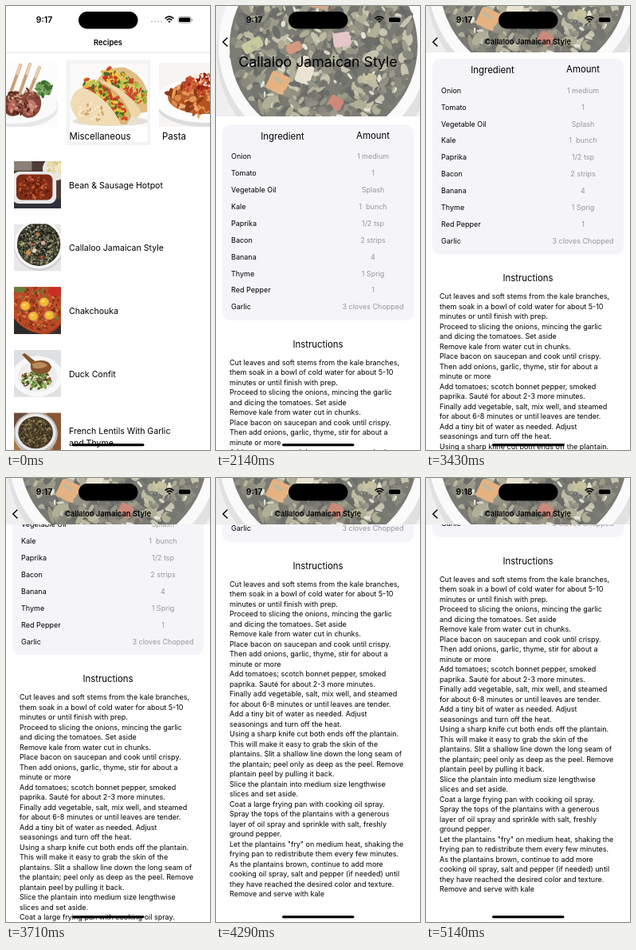
An HTML page that plays this animation: 256 by 555 pixels, repeating every 6.18 s.

```html
<!DOCTYPE html>
<html lang="en">
<head>
<meta charset="utf-8">
<title>Recipes</title>
<style>
html, body { margin: 0; width: 100%; height: 100%; overflow: hidden; background: #fff; }
#stage { display: block; width: 256px; height: 555px; font-family: Inter, "Liberation Sans", sans-serif; }
text { white-space: pre; }
</style>
</head>
<body>
<svg id="stage" viewBox="0 0 256 555"></svg>
<script>
const LOOP = 6180, FPS = 7;
const stage = document.getElementById('stage');

let seed = 7;
const rnd = (a = 0, b = 1) => {
  seed = (seed * 16807) % 2147483647;
  return a + (b - a) * seed / 2147483647;
};
const clamp = v => Math.max(0, Math.min(1, v));

// ---- drawing helpers ----
const text = (x, mid, str, size, extra = '') =>
  `<text x="${x}" y="${mid + size * 0.36}" font-size="${size}" ${extra}>${str}</text>`;
const rect = (x, y, w, h, fill, r = 0, extra = '') =>
  `<rect x="${x}" y="${y}" width="${w}" height="${h}" rx="${r}" fill="${fill}" ${extra}/>`;
const oval = (x, y, rx, ry, fill, turn = 0) =>
  `<ellipse cx="${x}" cy="${y}" rx="${rx}" ry="${ry}" fill="${fill}" transform="rotate(${turn} ${x} ${y})"/>`;
const path = (d, fill, extra = '') => `<path d="${d}" fill="${fill}" ${extra}/>`;
const chunk = (x, y, w, h, fill, turn) =>
  rect(x - w / 2, y - h / 2, w, h, fill, 4, `transform="rotate(${turn} ${x} ${y})"`);
const turned = (deg, x, y, art) => `<g transform="rotate(${deg} ${x} ${y})">${art}</g>`;
const photo = (x, y, w, h, id, box = '0 0 100 100') =>
  `<svg x="${x}" y="${y}" width="${w}" height="${h}" viewBox="${box}" preserveAspectRatio="xMidYMid slice"><use href="#${id}"/></svg>`;

// Random bits of food inside an ellipse
function scatter(n, cx, cy, rx, ry, size, colors) {
  let out = '';
  for (let i = 0; i < n; i++) {
    const a = rnd(0, 6.283), d = Math.sqrt(rnd());
    out += oval((cx + Math.cos(a) * d * rx).toFixed(1), (cy + Math.sin(a) * d * ry).toFixed(1),
      (rnd(0.6, 1.3) * size).toFixed(1), (rnd(0.3, 0.7) * size).toFixed(1),
      colors[Math.floor(rnd(0, colors.length))], rnd(0, 180) | 0);
  }
  return out;
}

// ---- food pictures ----
const filling = ['#8fae3c', '#d04a2a', '#f0c84a', '#4c6a28', '#e6b93a', '#c8381f', '#b8cc5a'];
const photos = {
  hotpot: rect(0, 0, 100, 100, '#4b3c36') + rect(0, 0, 38, 20, '#8c8178') +
    oval(88, 16, 27, 25, '#e9e6df') + scatter(24, 88, 14, 20, 18, 7, ['#e9d9a0', '#f3e8c0', '#d8c88a']) +
    path('M0 90L100 80V100H0z', '#30323a') +
    rect(-4, 22, 94, 68, '#e9e8e6', 15) + rect(5, 28, 77, 54, '#7e2c17', 11) +
    scatter(170, 43, 55, 34, 23, 3.2, ['#b0421f', '#6b2413', '#c8643c', '#8d2e17', '#4f1a10']),

  callaloo: rect(0, 0, 256, 256, '#e8e8e9') + oval(138, 118, 137, 137, '#d2d2d2') +
    oval(135, 109, 132, 132, '#f8f8f8') + oval(135, 109, 118, 118, '#34342b') +
    scatter(620, 135, 109, 111, 111, 9,
      ['#20211c', '#2d2e25', '#4a4b38', '#66664a', '#85845f', '#38392c', '#a8a585', '#5a5340', '#191a17']) +
    scatter(130, 135, 109, 108, 108, 4, ['#c4c0a4', '#dad7c6', '#8f8d68', '#1c1d18']) +
    chunk(78, 155, 25, 24, '#d9893f', 25) + chunk(111, 144, 20, 24, '#e0d3bd', 18) +
    chunk(158, 101, 22, 18, '#dba9ae', -8) + chunk(150, 180, 18, 16, '#b04a35', 30) +
    chunk(98, 111, 20, 12, '#c0613c', -25) + chunk(46, 108, 26, 14, '#a9b06c', -28) +
    chunk(192, 150, 18, 14, '#a8a46a', 15) + chunk(130, 55, 24, 15, '#b9784a', 10) +
    scatter(60, 135, 109, 105, 105, 6, ['#5c5d44', '#2b2c22', '#97956f']),

  chakchouka: rect(0, 0, 100, 100, '#a83d1e') + oval(50, 46, 62, 52, '#b94a26') +
    scatter(190, 50, 45, 52, 45, 4, ['#d0602f', '#a63a1c', '#d97b42', '#7a2c16', '#8f3418', '#6f7a38']) +
    [[24, 40], [64, 32], [41, 62], [75, 60]].map(([x, y]) =>
      oval(x, y, 11, 10, '#dd9a58') + oval(x, y, 8.5, 8, '#f0bd30') + oval(x - 2, y - 2, 3, 2, '#f9e28a')).join('') +
    oval(88, 8, 15, 12, '#c92f22') + oval(12, 5, 14, 7, '#687a3a') +
    path('M0 66Q24 98 70 100H0z', '#2d2a2a') + path('M100 78Q88 96 68 100H100z', '#38302d'),

  duck: rect(0, 0, 100, 100, '#dfe0e1') + oval(50, 56, 54, 43, '#f8f8f8') + oval(50, 56, 42, 33, '#ececec') +
    scatter(150, 48, 64, 32, 20, 4, ['#5f8a35', '#86ad4c', '#3f6726', '#a9c06c', '#8a5b33', '#d8d3b8', '#5a3a24']) +
    path('M17 10L23 7L45 24Q74 18 80 36Q76 54 52 51Q32 48 36 30z', '#85552c') +
    path('M38 30Q58 21 72 33Q60 42 42 39z', '#bb8a57'),

  lentils: rect(0, 0, 100, 100, '#a9774b') + path('M70 0H100V100H88z', '#8a5836') +
    path('M0 0H30L0 40z', '#6b4b39') + oval(46, 44, 47, 45, '#bdbbb8') + oval(46, 42, 43, 40, '#ebeae8') +
    oval(46, 42, 37, 34, '#463b28') +
    scatter(330, 46, 42, 34, 31, 2.5, ['#75633c', '#3d3422', '#8c7a4c', '#2a241a', '#a2905e', '#5c4d2d']),

  lamb: rect(0, 0, 105, 80, '#fcfcfc') + oval(48, 56, 58, 26, '#e7e8ea') + oval(48, 53, 56, 23, '#fafafa') +
    path('M58 3L47 34M70 2L58 36M82 6L68 40', 'none', 'stroke="#c99f78" stroke-width="4" stroke-linecap="round"') +
    path('M58 3L54 14M70 2L66 14M82 6L77 18', 'none', 'stroke="#e8d3b4" stroke-width="3" stroke-linecap="round"') +
    oval(50, 51, 13, 16, '#6d3a2d', 20) + oval(70, 52, 14, 17, '#83463a', 15) +
    oval(50, 55, 8, 9, '#b8665c') + oval(70, 56, 8, 10, '#c4766b', 15) +
    scatter(60, 61, 49, 24, 16, 3, ['#5f2f23', '#9c5b46', '#d29a88', '#4f271e']) +
    scatter(38, 87, 32, 9, 9, 4, ['#558444', '#77a35c', '#3f6d35']),

  tacos: rect(0, 0, 98, 78, '#fbfaf8') + oval(52, 72, 48, 6, '#e5dfd6') +
    path('M34 22Q46 3 70 5Q96 16 98 40V60Q80 66 70 52z', '#e0bd84') +
    turned(34, 70, 27, scatter(150, 70, 27, 34, 11, 3.4, filling)) +
    path('M38 21Q66 27 88 56Q92 64 84 68Q72 66 68 50z', '#eed6a9') +
    path('M12 36Q24 18 40 24Q66 34 78 66L72 76H40z', '#d9b077') +
    turned(42, 45, 44, scatter(160, 45, 44, 37, 12, 3.4, filling)) +
    path('M1 50Q6 27 22 32Q52 46 65 77H28Q6 74 1 50z', '#f0dcb4') +
    scatter(24, 28, 60, 22, 11, 2.5, ['#e0bd84', '#f7e9cd', '#d3a566']),

  pasta: rect(0, 0, 105, 80, '#f6f5f4') + oval(56, 50, 61, 30, '#dcdcdd') + oval(56, 47, 60, 28, '#fdfdfd') +
    oval(56, 43, 45, 21, '#b9602f') +
    scatter(120, 56, 43, 43, 20, 6, ['#dd8b47', '#b4531f', '#ebab6c', '#8f3a1a', '#e39a55']) +
    scatter(90, 59, 27, 27, 13, 4, ['#a92d18', '#c7472a', '#8d2314', '#d86a45']) +
    scatter(26, 59, 21, 20, 9, 2.2, ['#f6ead2', '#fbf5e8'])
};
const symbols = Object.entries(photos).map(([id, art]) => `<g id="${id}">${art}</g>`).join('');

// ---- list page ----
const dishes = [
  ['hotpot', 'Bean &amp; Sausage Hotpot'], ['callaloo', 'Callaloo Jamaican Style'],
  ['chakchouka', 'Chakchouka'], ['duck', 'Duck Confit'],
  ['lentils', 'French Lentils With Garlic', 'and Thyme']
];
const listPage = rect(0, 0, 256, 555, '#fff') + rect(0, 58, 256, 0.8, '#dedede') +
  rect(75.5, 67.5, 105.5, 106.5, '#f3f3f4') + rect(80, 72, 97.5, 98, '#fff') +
  photo(-40, 71, 105, 80, 'lamb', '0 0 105 80') +
  photo(79.5, 72, 98, 78, 'tacos', '0 0 98 78') +
  photo(192, 71, 105, 80, 'pasta', '0 0 105 80') +
  text(79.5, 162.5, 'Miscellaneous', 11.4) + text(196, 162.5, 'Pasta', 11.4) +
  dishes.map(([id, a, b], i) => {
    const y = 194 + i * 78.6;
    return photo(10, y, 59, 59, id, id === 'callaloo' ? '0 0 256 256' : undefined) +
      (b ? text(79, y + 23, a, 10.55) + text(79, y + 37.5, b, 10.55) : text(79, y + 30, a, 10.55));
  }).join('') +
  text(128, 45.6, 'Recipes', 9.4, 'id="listTitle" text-anchor="middle" font-weight="600"');

// ---- recipe page ----
const ingredients = [
  ['Onion', '1 medium'], ['Tomato', '1'], ['Vegetable Oil', 'Splash'], ['Kale', '1  bunch'],
  ['Paprika', '1/2 tsp'], ['Bacon', '2 strips'], ['Banana', '4'], ['Thyme', '1 Sprig'],
  ['Red Pepper', '1'], ['Garlic', '3 cloves Chopped']
];
const steps = `Cut leaves and soft stems from the kale branches,
them soak in a bowl of cold water for about 5-10
minutes or until finish with prep.
Proceed to slicing the onions, mincing the garlic
and dicing the tomatoes. Set aside
Remove kale from water cut in chunks.
Place bacon on saucepan and cook until crispy.
Then add onions, garlic, thyme, stir for about a
minute or more
Add tomatoes; scotch bonnet pepper, smoked
paprika. Sauté for about 2-3 more minutes.
Finally add vegetable, salt, mix well, and steamed
for about 6-8 minutes or until leaves are tender.
Add a tiny bit of water as needed. Adjust
seasonings and turn off the heat.
Using a sharp knife cut both ends off the plantain.
This will make it easy to grab the skin of the
plantains. Slit a shallow line down the long seam of
the plantain; peel only as deep as the peel. Remove
plantain peel by pulling it back.
Slice the plantain into medium size lengthwise
slices and set aside.
Coat a large frying pan with cooking oil spray.
Spray the tops of the plantains with a generous
layer of oil spray and sprinkle with salt, freshly
ground pepper.
Let the plantains "fry" on medium heat, shaking the
frying pan to redistribute them every few minutes.
As the plantains brown, continue to add more
cooking oil spray, salt and pepper (if needed) until
they have reached the desired color and texture.
Remove and serve with kale`.split('\n');

const middle = 'text-anchor="middle"';
const content = rect(8, 148.5, 240, 244.5, '#f4f4f9', 10) +
  text(83.5, 162.5, 'Ingredient', 11.4, middle) + text(197, 161.5, 'Amount', 11.4, middle) +
  ingredients.map(([name, amount], i) => {
    const y = 188 + i * 20.9;
    return text(19, y, name, 9) + text(197, y, amount, 9, middle + ' fill="#98989c"');
  }).join('') +
  text(128, 422.5, 'Instructions', 11.4, middle) +
  steps.map((line, i) => text(17, 445.5 + i * 12.5, line, 9)).join('');

const recipePage = rect(0, 0, 256, 555, '#fff') + `<g id="content">${content}</g>` +
  `<g id="hero">${rect(0, 0, 256, 138, '#fff')}<g opacity=".65">${photo(0, 0, 256, 138, 'callaloo', '0 59 256 138')}</g>
   ${text(128, 69.5, 'Callaloo Jamaican Style', 17.7, 'id="heroTitle" ' + middle)}</g>` +
  text(128, 45, 'Callaloo Jamaican Style', 9.4, 'id="navTitle" font-weight="600" ' + middle);

// ---- phone chrome ----
const chrome =
  path('M14 40L8.8 45L14 50', 'none', 'id="back" stroke="#000" stroke-width="1.5" stroke-linecap="round" stroke-linejoin="round"') +
  text(48, 17.5, '9:17', 10.4, 'id="clock" font-weight="600" ' + middle) +
  rect(91, 7, 74.5, 21.5, '#000', 10.75) +
  [183, 187, 191, 195].map(x => oval(x, 19.5, 0.9, 0.9, '#b5b5b5')).join('') +
  path('M199.6 15.6Q205 10.8 210.4 15.6M201.7 17.6Q205 14.8 208.3 17.6', 'none', 'stroke="#000" stroke-width="1.6"') +
  path('M203.2 19.1Q205 17.7 206.8 19.1L205 21z', '#000') +
  rect(216, 13.4, 16.4, 7.8, 'none', 2.4, 'stroke="#999" stroke-width=".8"') +
  rect(217.1, 14.5, 14.2, 5.6, '#000', 1.5) + rect(233.3, 15.9, 1, 2.8, '#999', 0.5) +
  rect(83, 547, 90.5, 3.2, '#000', 1.6);

stage.innerHTML = `<defs>${symbols}</defs><g id="list">${listPage}</g><g id="recipe">${recipePage}</g>${chrome}`;

// ---- motion ----
const el = id => document.getElementById(id);
const move = (id, x, y) => el(id).setAttribute('transform', `translate(${x.toFixed(2)} ${y.toFixed(2)})`);
const fade = (id, v) => el(id).setAttribute('opacity', clamp(v).toFixed(3));

// Critically damped push from the right
function pushAt(t) {
  if (t < 1.7) return 0;
  if (t > 2.1) return 1;
  const x = 16.37 * (t - 1.63);
  return 1 - (1 + x) * Math.exp(-x);
}

// Swipe down the page, then a small bounce back
function scrollAt(t) {
  if (t < 3.1) return 0;
  const u = clamp((t - 2.934) / 1.4913), v = clamp((t - 4.58) / 0.4);
  return 321 * u * u * (3 - 2 * u) - 2 * v * v * (3 - 2 * v);
}

function draw(now) {
  const t = Math.floor((now % LOOP + 5) * FPS / 1000) / FPS;
  const p = pushAt(t), s = scrollAt(t);
  move('list', -77 * p, 0);
  move('recipe', 256 * (1 - p), 0);
  fade('listTitle', 1 - 1.4 * p);
  fade('back', p);
  fade('content', t > 1.8 ? 1 : 0); // the recipe loads just after the push begins
  move('content', 0, -s);
  move('hero', 0, -Math.min(s, 80));
  fade('heroTitle', 1 - s / 60);
  fade('navTitle', (s - 45) / 30);
  el('clock').textContent = t > 4.5 ? '9:18' : '9:17';
  requestAnimationFrame(draw);
}
draw(performance.now());
</script>
</body>
</html>
```
